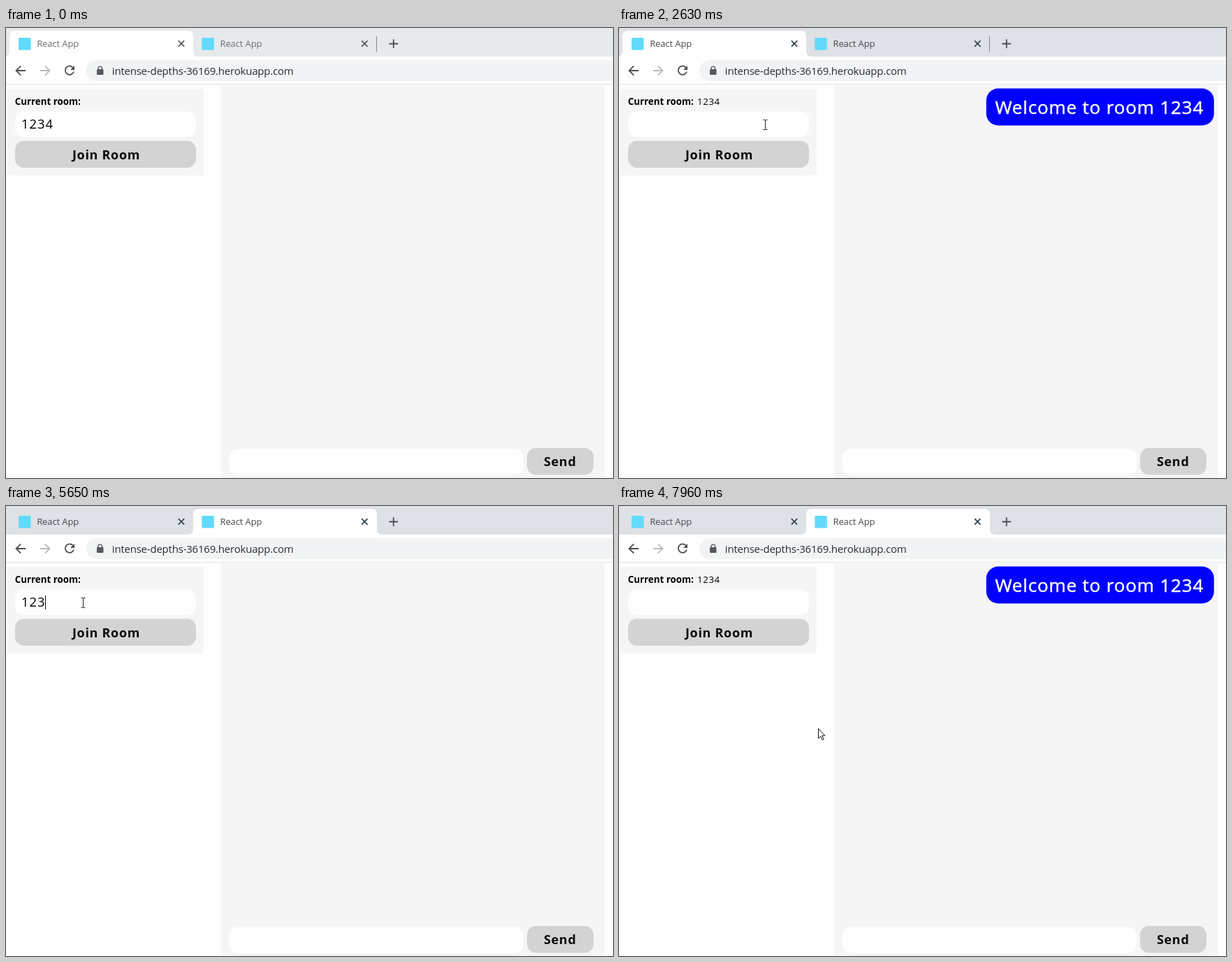
These frames come from a looping animation (869x644 px, 8 s). An HTML page:

```html
<!DOCTYPE html>
<html lang="en">
<head>
<meta charset="utf-8">
<title>Chat room</title>
<style>
  html, body { margin: 0; width: 100%; height: 100%; overflow: hidden; background: #fefefe; }
  svg { display: block; }
  text { font-family: "Open Sans", "Noto Sans", sans-serif; white-space: pre; }
  .tab { font-size: 13px; letter-spacing: -.1px; fill: #45494d; }
  .unfocused .tab { fill: #6a6e72; }
  .url { font-size: 15px; letter-spacing: -.21px; fill: #2a2d31; }
  .label { font-size: 13.3px; font-weight: bold; }
  .room { font-size: 13.3px; letter-spacing: .6px; }
  .typed { font-size: 18.4px; letter-spacing: 1px; }
  .button { font-size: 18px; font-weight: bold; letter-spacing: .7px; fill: #0a0a0a; }
  .message { font-size: 26px; letter-spacing: .85px; fill: #fff; stroke: #fff; stroke-width: .5; }
  .line { fill: none; stroke: #4a4e52; stroke-width: 1.8; }
  .close { fill: none; stroke: #35424d; stroke-width: 1.7; }
  .unfocused .close { stroke: #55595d; }
  .panel { fill: #f5f5f5; }
  .field { fill: #fefefe; }
  .strip { fill: #dee1e6; }
  .unfocused .strip { fill: #e7eaed; }
</style>
</head>
<body>
<svg id="stage" width="869" height="644" viewBox="0 0 869 644">
  <rect width="869" height="644" fill="#fefefe"/>

  <rect class="strip" width="869" height="41"/>
  <path id="hover" d="M260 41q8 0 8-8V12q0-8 8-8H523q8 0 8 8V33q0 8 8 8z" fill="#eff1f4"/>
  <path id="active" d="M-3 41q8 0 8-8V12q0-8 8-8H260q8 0 8 8V33q0 8 8 8z" fill="#fefefe"/>
  <g id="tab">
    <rect x="18" y="14" width="17.5" height="17.5" rx="1.5" fill="#61dafb"/>
    <text class="tab" x="44.2" y="27">React App</text>
    <path class="close" d="M246.8 18.2l8.4 8.4m0-8.4l-8.4 8.4"/>
  </g>
  <use href="#tab" x="262.3"/>
  <path id="divider" d="M530.5 12V34" stroke="#80858b"/>
  <path class="line" d="M548.5 22.5h12.6m-6.3-6.3v12.6"/>

  <path class="line" d="M28 61H14.6m6.6-6.7L14.5 61l6.7 6.7"/>
  <path class="line" style="stroke:#b9bbbd" d="M49 61H62.4m-6.6-6.7L62.5 61l-6.7 6.7"/>
  <path class="line" d="M95.6 56.4A6.2 6.2 0 1 0 97 62.4"/>
  <path d="M98 54v6h-6z" fill="#4a4e52"/>
  <rect x="115" y="46" width="780" height="30" rx="15" fill="#f1f3f4"/>
  <rect x="130" y="59" width="9.5" height="8" rx="1" fill="#54595d"/>
  <path d="M132 59.5v-1.6a2.8 2.8 0 0 1 5.6 0v1.6" fill="none" stroke="#54595d" stroke-width="1.4"/>
  <text class="url" x="151.8" y="66.5">intense-depths-36169.herokuapp.com</text>
  <path d="M0 80.5H869" stroke="#dfe0e2"/>

  <rect class="panel" x="2" y="87" width="281" height="124" rx="4"/>
  <text class="label" x="12.8" y="110.3">Current room:</text>
  <text class="room" id="room" x="112" y="110.3">1234</text>
  <rect class="field" x="13" y="119.5" width="259" height="36.5" rx="12.5"/>
  <text class="typed" id="typed" x="22" y="144.3"></text>
  <rect id="caret" y="128" width="1" height="20"/>
  <rect id="join" x="13" y="161.5" width="259" height="38.5" rx="12.5"/>
  <text class="button" x="143.5" y="187.7" text-anchor="middle">Join Room</text>

  <rect class="panel" x="308" y="82" width="549" height="562"/>
  <rect class="field" x="319.5" y="602.5" width="421.5" height="37.5" rx="12.5"/>
  <rect x="746" y="601" width="95" height="38.5" rx="12.5" fill="#d3d3d3"/>
  <text class="button" x="793.2" y="627.3" text-anchor="middle">Send</text>
  <g id="welcome">
    <rect x="525.8" y="86.6" width="326" height="52.8" rx="17" fill="#00f"/>
    <text class="message" x="538.4" y="122.8">Welcome to room 1234</text>
  </g>

  <path id="arrow" d="M.5 .5V14.5L3.6 11.6 6 16.8 8 15.9 5.7 10.8H9.9z" fill="#fff" stroke="#111" stroke-linejoin="round"/>
  <path id="beam" d="M-2.5 -6.5H-1Q.5 -6.5 .5 -5.5Q.5 -6.5 2 -6.5H3.5M.5 -5.5V6.5M-2.5 7.5H-1Q.5 7.5 .5 6.5Q.5 7.5 2 7.5H3.5" fill="none" stroke="#222"/>
</svg>
<script>
  const LOOP = 8000;
  const OFF = { x: 470, y: 720 };
  const at = {
    focus: 1990, joined: 2070, welcomed: 2160, tabSwitch: 3100,
    caretOn: 4710, caretOff: 6310, keys: [5170, 5340, 5650, 5810],
    rejoined: 6740, rewelcomed: 6820, pointerOut: 7650, pointerBack: 7900
  };

  const pt = (x, y) => ({ x, y });
  const move = (start, end, steps, from, bend, to, power = 1) =>
    ({ start, end, steps, from, bend, to, power });

  // Each stroke of the pointer is a stepped quadratic curve, optionally eased out.
  const moves = [
    move(120, 880, 11, pt(607, 620), pt(190, 250), pt(72, 166)),
    move(940, 1620, 10, pt(64, 162), pt(65, 134), pt(148, 179)),
    move(2550, 2840, 5, pt(178, 165), pt(226, 116), pt(384, 24)),
    move(3020, 3780, 11, pt(385, 23), pt(394, 20), pt(400, 16)),
    move(3860, 4540, 10, pt(330, 62), pt(122, 222), pt(110, 138), 3),
    move(5980, 6510, 8, pt(110, 141), pt(112, 170), pt(113, 183)),
    move(7210, 7575, 6, pt(135, 192), pt(320, 270), pt(620, 489)),
    move(7900, 7960, 2, pt(476, 605), pt(380, 460), pt(285, 318))
  ];

  const $ = id => document.getElementById(id);
  const show = (id, on) => $(id).setAttribute("visibility", on ? "visible" : "hidden");
  const between = (v, a, b) => v >= a && v < b;

  function pointer(t) {
    const m = moves.filter(m => m.start <= t).pop();
    if (!m || between(t, at.pointerOut, at.pointerBack)) return OFF;
    const last = m.steps - 1;
    // A small lead keeps rounded step times from landing late.
    const step = Math.min(last, Math.floor((t - m.start) / (m.end - m.start) * last + .15));
    const u = 1 - (1 - step / last) ** m.power;
    const curve = k => Math.round(
      (1 - u) ** 2 * m.from[k] + 2 * u * (1 - u) * m.bend[k] + u * u * m.to[k]);
    return pt(curve("x"), curve("y"));
  }

  function typedText(t) {
    if (t < at.joined) return "1234";
    if (t >= at.rejoined) return "";
    return "1234".slice(0, at.keys.filter(k => k <= t).length);
  }

  function render(t) {
    const { x, y } = pointer(t);
    const second = t >= at.tabSwitch;
    const text = typedText(t);
    const overJoin = between(x, 13, 272) && between(y, 161, 200);
    const overText = between(x, 13, 272) && between(y, 119, 156) ||
                     between(x, 150, 869) && between(y, 46, 76);
    const overTab = !second && between(x, 268, 531) && between(y, 4, 41);

    $("stage").classList.toggle("unfocused", t < at.focus);
    $("active").setAttribute("transform", `translate(${second ? 263 : 0})`);
    show("hover", overTab);
    show("divider", !second && !overTab);

    $("typed").textContent = text;
    $("caret").setAttribute("x", 22 + Math.floor(11.5 * text.length));
    show("caret", between(t, at.caretOn, at.caretOff));
    show("room", between(t, at.joined, at.tabSwitch) || t >= at.rejoined);
    show("welcome", between(t, at.welcomed, at.tabSwitch) || t >= at.rewelcomed);
    $("join").setAttribute("fill", overJoin ? "#90ee90" : "#d3d3d3");

    for (const id of ["arrow", "beam"]) {
      show(id, (id === "beam") === overText);
      $(id).setAttribute("transform", `translate(${x} ${y})`);
    }
  }

  const begin = performance.now();
  function tick() {
    render((performance.now() - begin) % LOOP);
    requestAnimationFrame(tick);
  }
  tick();
</script>
</body>
</html>
```
